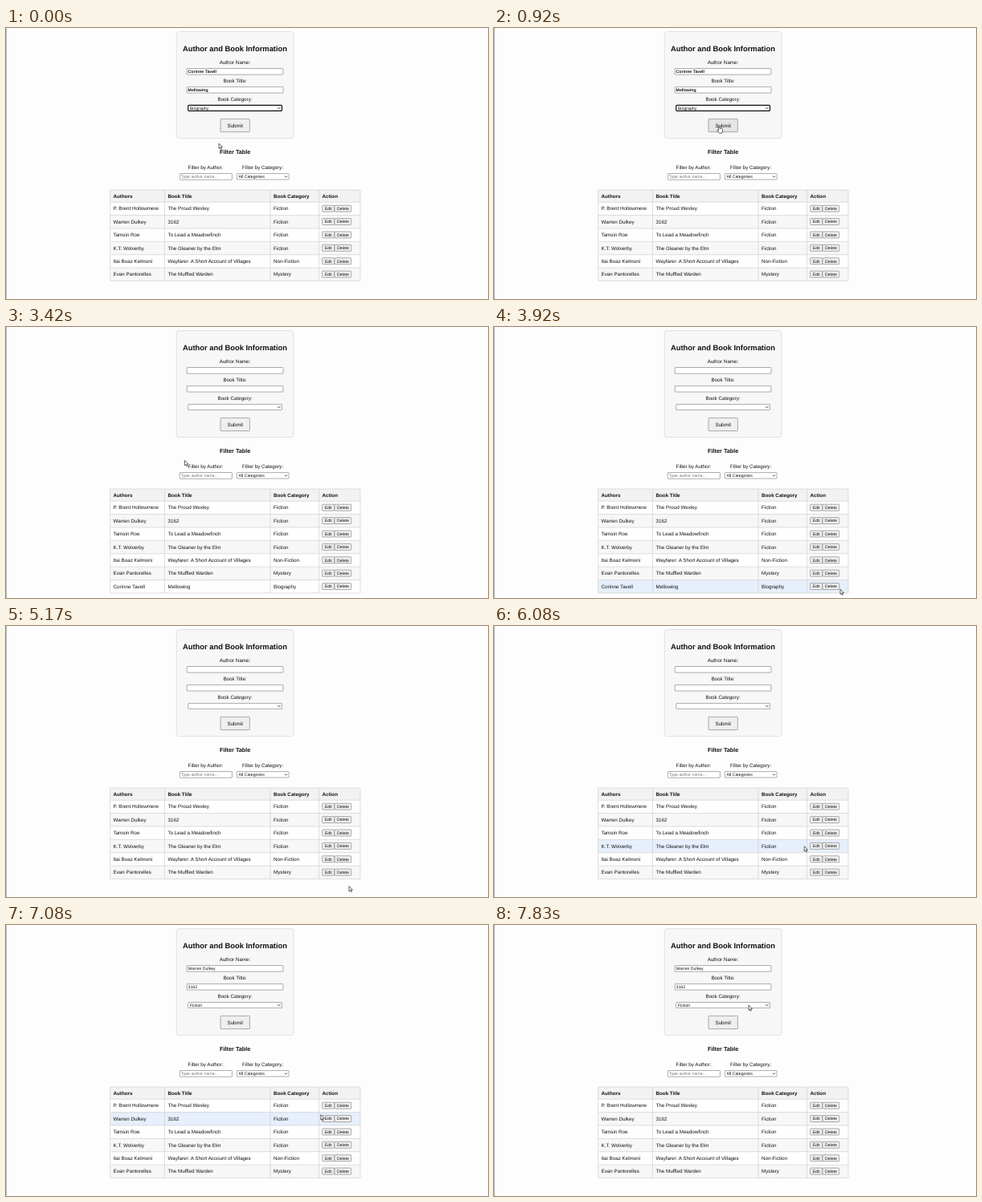
Write an HTML page with a canvas that moves like this. It is 600 px wide and 338 px high and loops after 8 s.

```html
<!DOCTYPE html>
<html lang="en">
<head>
<meta charset="utf-8">
<title>Author and Book Information</title>
<style>
html, body { margin: 0; width: 100%; height: 100%; overflow: hidden; background: #fdfdfd; }
canvas { display: block; width: 600px; height: 338px; }
</style>
</head>
<body>
<canvas id="stage"></canvas>
<script>
const canvas = document.getElementById("stage");
const ctx = canvas.getContext("2d");
const dpr = window.devicePixelRatio || 1;
canvas.width = 600 * dpr;
canvas.height = 338 * dpr;

const LOOP = 8000, TICK = 1000 / 12;
const SUBMIT_AT = 32, DELETE_AT = 61, EDIT_AT = 85;
const BODY = 6.25, CONTROL = 5.2;
const LEFT = 129.5, RIGHT = 441, HEAD = 202, TOP = 217.2, ROW = 16.38;
const COLS = [197.5, 329, 389.5];

const books = [
  ["P. Brent Hollowmere", "The Proud Wexley", "Fiction"],
  ["Warren Dulkey", "3162", "Fiction"],
  ["Tamsin Roe", "To Lead a Meadowfinch", "Fiction"],
  ["K.T. Wolverby", "The Gleaner by the Elm", "Fiction"],
  ["Itai Boaz Kelmoni", "Wayfarer: A Short Account of Villages", "Non-Fiction"],
  ["Evan Pantorelles", "The Muffled Warden", "Mystery"]
];
const added = ["Corinne Tavell", "Mellowing", "Biography"];

// Pointer stops: tick, x, y
const stops = [
  [0, 265, 144], [8, 280, 122], [9, 280, 122], [17, 281, 120.5], [19, 281, 120.5],
  [22, 282.5, 122], [35, 282.5, 122], [36, 282.5, 122.4], [38, 282.5, 122.4],
  [41, 222.5, 166.5], [44, 398, 321], [45, 398, 321], [47, 431, 327], [48, 430, 328],
  [49, 430, 328], [51, 427.5, 324.7], [53, 427.5, 324.7], [54, 427, 324.5], [66, 427, 324.5],
  [76, 375, 261], [79, 394, 241], [81, 394, 241], [82, 394, 240.6], [84, 394, 240.6],
  [94, 317, 100], [96, 317, 100]
];

function pointerAt(tick) {
  const i = Math.max(1, stops.findIndex(s => s[0] >= tick));
  const [t0, x0, y0] = stops[i - 1], [t1, x1, y1] = stops[i];
  const k = (tick - t0) / (t1 - t0), e = k * k * (3 - 2 * k);
  return { x: x0 + (x1 - x0) * e, y: y0 + (y1 - y0) * e };
}

// cy is the middle of the capitals
function text(str, x, cy, size = BODY, { align = "left", bold = false, color = "#111" } = {}) {
  ctx.font = `${bold ? "bold " : ""}${size}px "Liberation Sans", Arial, sans-serif`;
  ctx.textAlign = align;
  ctx.fillStyle = color;
  ctx.fillText(str, x, cy + size * 0.355);
}

const centered = (str, x, cy, size, bold) => text(str, x, cy, size, { align: "center", bold });

function box(x, y, w, h, r, fill, stroke, line = 0.6) {
  ctx.beginPath();
  ctx.roundRect(x, y, w, h, r);
  ctx.fillStyle = fill;
  ctx.fill();
  ctx.strokeStyle = stroke;
  ctx.lineWidth = line;
  ctx.stroke();
}

function line(x0, y0, x1, y1) {
  ctx.beginPath();
  ctx.moveTo(x0, y0);
  ctx.lineTo(x1, y1);
  ctx.stroke();
}

const inside = (p, x, y, w, h) => p.x >= x && p.x <= x + w && p.y >= y && p.y <= y + h;

function button(label, x, y, w, h, size, p) {
  box(x, y, w, h, 1, inside(p, x, y, w, h) ? "#e5e5e5" : "#efefef", "#767676");
  centered(label, x + w / 2, y + h / 2, size);
}

function input(x, y, w, h, value, style) {
  box(x, y, w, h, 0.6, "#fff", "#767676");
  text(value, x + 1.4, y + h / 2, CONTROL, style);
}

function select(x, y, w, h, value, focused) {
  box(x, y, w, h, 0.6, "#fff", "#767676");
  if (focused) box(x, y, w, h, 1.2, "#fff", "#101010", 1.2);
  text(value, x + 2.2, y + h / 2, CONTROL);
  const cx = x + w - 3.6, cy = y + h / 2;
  ctx.beginPath();
  ctx.moveTo(cx - 1.5, cy - 0.7);
  ctx.lineTo(cx, cy + 0.8);
  ctx.lineTo(cx + 1.5, cy - 0.7);
  ctx.strokeStyle = "#111";
  ctx.lineWidth = 0.8;
  ctx.stroke();
}

function drawForm(tick, p) {
  const typed = tick < SUBMIT_AT;
  const values = typed ? added : tick >= EDIT_AT ? books[1] : ["", "", ""];
  box(212.2, 4.6, 145.8, 133, 3, "#f7f7f7", "#d0d0d0");
  centered("Author and Book Information", 285, 25.8, 9.375, true);
  centered("Author Name:", 285, 42.5);
  input(225.2, 50.5, 119.8, 7.6, values[0], { bold: typed });
  centered("Book Title:", 285, 65.5);
  input(225.2, 73.4, 119.8, 7.6, values[1], { bold: typed });
  centered("Book Category:", 285, 88.5);
  select(226.7, 96.4, 116.8, 7, values[2], typed);
  button("Submit", 267, 113.4, 36.4, 16.2, BODY, p);
}

function drawFilters() {
  centered("Filter Table", 285.2, 154.5, 7.31, true);
  centered("Filter by Author:", 248.5, 174);
  centered("Filter by Category:", 319.6, 174);
  input(216.3, 181.5, 65.1, 7.8, "Type author name...", { color: "#757575" });
  select(287.3, 181.6, 64.8, 7.4, "All Categories", false);
}

function drawTable(rows, p) {
  const bottom = TOP + rows.length * ROW;
  const cellX = [LEFT, ...COLS].map(x => x + 4);
  ctx.fillStyle = "#f2f2f2";
  ctx.fillRect(LEFT, HEAD, RIGHT - LEFT, TOP - HEAD);
  ["Authors", "Book Title", "Book Category", "Action"].forEach((h, i) =>
    text(h, cellX[i], 209.3, BODY, { bold: true }));

  rows.forEach((row, i) => {
    const y = TOP + i * ROW, mid = y + ROW / 2 - 0.2;
    const hover = inside(p, LEFT, y, RIGHT - LEFT, ROW);
    ctx.fillStyle = hover ? "#e6effb" : i % 2 ? "#f7f7f7" : "#fefefe";
    ctx.fillRect(LEFT, y, RIGHT - LEFT, ROW);
    row.forEach((cell, c) => text(cell, cellX[c], mid));
    button("Edit", 393.6, mid - 4, 15.2, 8, CONTROL, p);
    button("Delete", 409, mid - 4, 20.8, 8, CONTROL, p);
  });

  ctx.strokeStyle = "#d2d2d2";
  ctx.lineWidth = 0.7;
  [LEFT, ...COLS, RIGHT].forEach(x => line(x, HEAD, x, bottom));
  line(LEFT, HEAD, RIGHT, HEAD);
  for (let i = 0; i <= rows.length; i++) line(LEFT, TOP + i * ROW, RIGHT, TOP + i * ROW);
}

function drawArrow() {
  ctx.beginPath();
  [[0, 0], [0, 6.3], [1.4, 5], [2.4, 7.2], [3.4, 6.8], [2.5, 4.6], [4.4, 4.5]]
    .forEach(([x, y]) => ctx.lineTo(x, y));
  ctx.closePath();
}

function drawHand() {
  ctx.beginPath();
  ctx.moveTo(-0.7, 5.8);
  ctx.lineTo(-0.7, 0.7);
  ctx.quadraticCurveTo(0, -0.5, 0.7, 0.7);
  ctx.lineTo(0.7, 3.4);
  ctx.lineTo(3.4, 3.9);
  ctx.quadraticCurveTo(4.6, 4.2, 4.5, 5.4);
  ctx.lineTo(4, 8);
  ctx.lineTo(3.6, 9.4);
  ctx.lineTo(0.3, 9.4);
  ctx.lineTo(-2.2, 6.2);
  ctx.quadraticCurveTo(-2.2, 4.8, -0.7, 5.8);
  ctx.closePath();
}

function drawPointer(p) {
  ctx.save();
  ctx.translate(p.x, p.y);
  if (inside(p, 267, 113.4, 36.4, 16.2)) drawHand();
  else drawArrow();
  ctx.fillStyle = "#fff";
  ctx.fill();
  ctx.strokeStyle = "#222";
  ctx.lineWidth = 0.7;
  ctx.lineJoin = "round";
  ctx.stroke();
  ctx.restore();
}

function frame(now) {
  const tick = Math.floor(((now % LOOP) + 5) / TICK) % 96;
  const p = pointerAt(tick);
  const listed = tick >= SUBMIT_AT && tick < DELETE_AT;

  ctx.setTransform(dpr, 0, 0, dpr, 0, 0);
  ctx.textRendering = "geometricPrecision";
  ctx.fillStyle = "#fdfdfd";
  ctx.fillRect(0, 0, 600, 338);
  ctx.fillStyle = "#a4a4a4";
  ctx.fillRect(0, 0, 0.8, 338);
  drawForm(tick, p);
  drawFilters();
  drawTable(listed ? [...books, added] : books, p);
  drawPointer(p);
  requestAnimationFrame(frame);
}
requestAnimationFrame(frame);
</script>
</body>
</html>
```
